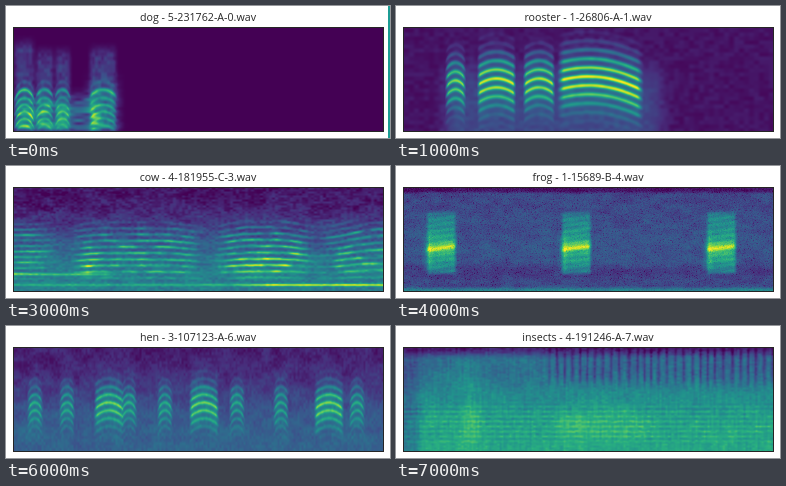
An HTML page with a canvas that plays this animation: 384 px wide and 132 px high, repeating every 8000 ms.

```html
<!DOCTYPE html>
<html lang="en">
<head>
<meta charset="utf-8">
<title>Animal sound spectrograms</title>
<style>
html, body { margin: 0; width: 100%; height: 100%; overflow: hidden; background: #fff; }
canvas { display: block; width: 384px; height: 132px; }
</style>
</head>
<body>
<canvas id="stage" width="384" height="132"></canvas>
<script>
const ctx = document.getElementById('stage').getContext('2d');
const LEFT = 8, TOP = 22, WIDTH = 369, HEIGHT = 103, HOLD = 1000;

const viridis = ['440154', '472d7b', '3b528b', '2c728e', '21918c', '28ae80', '5ec962', 'addc30', 'fde725']
  .map(hex => [0, 2, 4].map(i => parseInt(hex.slice(i, i + 2), 16)));

const clamp = (v, lo = 0, hi = 1) => Math.min(hi, Math.max(lo, v));
const mix = (a, b, t) => a + (b - a) * t;
const smooth = (a, b, v) => { const t = clamp((v - a) / (b - a)); return t * t * (3 - 2 * t); };
const bump = (v, center, width) => Math.exp(-(((v - center) / width) ** 2));
const gate = (v, a, b, soft = 2) => smooth(a - soft, a + soft, v) * (1 - smooth(b - soft, b + soft, v));
const blob = (x, y, cx, cy, rx, ry) => bump(x, cx, rx) * bump(y, cy, ry);

function grain(x, y) {
  const s = Math.sin(x * 12.9898 + y * 78.233) * 43758.5453;
  return s - Math.floor(s);
}

// Smooth value noise with cells of sx by sy pixels, centred on zero.
function cloud(x, y, sx, sy) {
  const u = x / sx, v = y / sy, i = Math.floor(u), j = Math.floor(v);
  const row = k => mix(grain(i, k), grain(i + 1, k), smooth(0, 1, u - i));
  return mix(row(j), row(j + 1), smooth(0, 1, v - j)) - 0.5;
}

// Stacked harmonics between a and b, arched by `bend` pixels and tilted by `tilt`.
function call(x, y, { a, b, cy, h, gap = 7, bend = 6, tilt = 0, peak = 0.5, level = 0.7, body = 0.4, soft = 2 }) {
  if (x < a - soft || x > b + soft) return 0;
  const u = (x - a) / (b - a);
  const line = y - cy - bend * ((u - peak) / Math.max(peak, 1 - peak)) ** 2 - tilt * (u - 0.5);
  const ridge = (0.5 + 0.5 * Math.cos(2 * Math.PI * line / gap)) ** 1.5;
  return level * gate(x, a, b, soft) * bump(line, 0, h) * (body + (1 - body) * ridge);
}

const sum = (x, y, calls) => calls.reduce((total, c) => total + call(x, y, c), 0);

const barks = [[9, 27, 0.4, 33], [30, 46, 0.3, 42], [49, 63, 0.25, 42], [84, 109, 0.3, 40]];

function dog(x, y) {
  let v = 0.3 * gate(x, 9, 92, 8) * smooth(78, 104, y) + 0.17 * gate(x, 80, 113, 7) * smooth(58, 100, y);
  v *= 0.85 + cloud(x, y, 9, 3);
  for (const [a, b, level, top] of barks) {
    const mid = (a + b) / 2, bend = a < 20 ? 8 : 6;
    v += gate(x, a, b, 4) * smooth(top - 6, top + 14, y) * (0.16 + 0.12 * cloud(x, y, 3, 4));
    v += call(x, y, { a, b, cy: 83, h: 7, gap: 9, bend, level: level * 1.1, body: 0.1 });
    v += call(x, y, { a, b, cy: 105, h: 15, gap: 7, bend, level, body: 0.25 });
    v += 0.35 * level * blob(x, y, mid, 119, (b - a) / 2, 3);
  }
  return v * (1 - 0.5 * smooth(121, 125, y));
}

const crows = [
  { a: 50, b: 68, cy: 74, h: 24, level: 0.65 },
  { a: 82, b: 118, cy: 72, h: 26, level: 0.75 },
  { a: 128, b: 157, cy: 72, h: 25, level: 0.7 },
  { a: 164, b: 244, cy: 70, h: 27, bend: 13, peak: 0.35, level: 0.8, soft: 4 }
].map(c => ({ gap: 9, body: 0.25, ...c }));

function rooster(x, y) {
  const tail = 0.16 * gate(x, 50, 264, 16) * smooth(38, 90, y);
  return 0.05 + tail + 0.06 * cloud(x, y, 5, 4) + sum(x, y, crows);
}

const grunts = [
  { a: 19, b: 30, cy: 80, h: 7, level: 0.26 },
  { a: 32, b: 46, cy: 82, h: 13, level: 0.34 },
  { a: 48, b: 60, cy: 80, h: 13, level: 0.36 },
  { a: 62, b: 74, cy: 77, h: 9, level: 0.28 },
  { a: 94, b: 104, cy: 81, h: 9, level: 0.34 },
  { a: 103, b: 117, cy: 64, h: 20, tilt: -10, level: 0.45 },
  { a: 130, b: 139, cy: 72, h: 16, tilt: -12, level: 0.45 },
  { a: 136, b: 163, cy: 62, h: 23, peak: 0.5, bend: 5, level: 0.6 },
  { a: 192, b: 210, cy: 80, h: 11, level: 0.38 },
  { a: 230, b: 247, cy: 68, h: 19, tilt: -12, level: 0.5 },
  { a: 247, b: 285, cy: 64, h: 23, peak: 0.5, bend: 5, level: 0.6 },
  { a: 312, b: 335, cy: 76, h: 17, level: 0.36 },
  { a: 352, b: 377, cy: 81, h: 14, level: 0.34 }
].map(c => ({ gap: 6.5, body: 0.4, ...c }));

function pig(x, y) {
  let v = 0.06 + 0.15 * smooth(25, 50, y) + 0.12 * smooth(50, 118, y);
  v += 0.08 * cloud(x, y, 12, 14) + 0.1 * cloud(x, y, 2, 3);
  for (const { a, b, level } of grunts) {
    v += 0.1 * gate(x, a, b, 3) * smooth(85, 105, y);
    if (level > 0.55) v += 0.3 * gate(x, a, b, 2) * gate(y, 28, 62, 6);
  }
  for (const gap of [82, 119, 222, 341]) v -= 0.08 * bump(x, gap, 3) * gate(y, 30, 110, 8);
  return v + sum(x, y, grunts) + 0.1 * bump(y, 122, 2);
}

function cow(x, y) {
  let v = 0.06 + 0.13 * smooth(30, 68, y) + 0.22 * smooth(55, 108, y);
  v += 0.09 * cloud(x, y, 14, 7) + 0.11 * cloud(x, y, 3, 2);
  const lift = 7 * gate(x, 65, 188, 35) + 8 * gate(x, 215, 299, 30) + 12 * smooth(295, 377, x);
  const height = clamp((120 - y) / 60, 0, 1.3);
  const ridge = (0.5 + 0.5 * Math.cos(2 * Math.PI * (y + lift * height - 118) / 5.5)) ** 1.5;
  const voiced = 0.22 * (1 - smooth(20, 60, x)) + 0.25 * gate(x, 70, 188, 14)
    + 0.3 * gate(x, 216, 300, 12) + 0.28 * smooth(300, 345, x);
  v += voiced * ridge * gate(y, 60, 110, 11) * (1 + 1.4 * cloud(x, y, 9, 5));
  v += 0.22 * blob(x, y, 85, 97, 12, 10) * ridge + 0.16 * blob(x, y, 260, 95, 28, 9) * ridge;
  v += 0.25 * bump(y, 108, 1.5) * (1 - smooth(90, 125, x));
  v += bump(y, 118.5, 1.4) * mix(0.17, 0.48, smooth(215, 265, x));
  return v + 0.09 * blob(x, y, 45, 45, 16, 12) * cloud(x, y, 2, 3);
}

function frog(x, y) {
  let v = 0.21 + 0.05 * bump(y, 78, 30) + 0.08 * cloud(x, y, 10, 5);
  v += 0.09 * (grain(x, y) - 0.5) - 0.1 * (grain(x + 91, y) > 0.94);
  v -= 0.17 * (1 - smooth(24, 28 + 2 * cloud(x, 0, 18, 1), y));
  v -= 0.06 * bump(y, 105, 6);
  v += 0.23 * smooth(119, 124, y);
  for (const start of [28, 163, 308]) {
    const u = (x - start) / 32;
    const shape = gate(x, start + 3, start + 31, 2.5) * gate(y, 46, 107, 3);
    const stripe = Math.cos(2 * Math.PI * (y + 4 * u) / 6);
    v += shape * (0.18 + 0.17 * bump(y, 83, 23) + 0.04 * stripe);
    v += 0.3 * gate(x, start + 2, start + 31, 3) * bump(y, 83 - 4 * u, 3.5);
    v += 0.1 * gate(x, start - 1, start + 7, 3) * gate(y, 67, 105, 7);
  }
  return v;
}

// A loud middle band, softer harmonics below it and faint ones above.
const meow = (a, b, cy, shape) => [
  { a, b, cy, h: 8, level: 0.5 },
  { a, b, cy: cy + 24, h: 19, level: 0.38 },
  { a, b, cy: cy - 16, h: 10, level: 0.2 }
].map(c => ({ gap: 6, body: 0.35, soft: 3, ...shape, ...c }));
const meows = [
  ...meow(49, 135, 66, { bend: 5, peak: 0.6, tilt: 0 }),
  ...meow(202, 324, 66, { bend: 6, peak: 0.6, tilt: -3 })
];

function cat(x, y) {
  let v = 0;
  for (const [a, b] of [[48, 137], [201, 328]]) {
    const inside = gate(x, a, b, 1.5);
    v += inside * smooth(24, 50, y) * (0.19 + 0.12 * cloud(x, y, 2, 14) + 0.08 * cloud(x, y, 3, 3));
    v += 0.25 * inside * bump(y, 114, 1.3);
  }
  return v + sum(x, y, meows);
}

const clucks = [22, 54, 89, 116, 152, 184, 224, 268, 309, 344].map((a, i) => (
  { a, b: a + (i % 3 === 2 ? 27 : 13), cy: 76, h: 21, gap: 8, bend: 6, level: i % 3 === 2 ? 0.54 : 0.36, body: 0.35 }
));

function hen(x, y) {
  return 0.09 + 0.22 * smooth(28, 112, y) + 0.08 * cloud(x, y, 10, 8)
    + 0.07 * cloud(x, y, 2, 3) + sum(x, y, clucks);
}

function insects(x, y) {
  const onset = mix(0.72, 1, smooth(16, 30, x));
  let v = 0.06 + 0.3 * smooth(21, 34, y) + 0.12 * smooth(40, 75, y) + 0.1 * smooth(70, 100, y);
  v *= onset;
  v += 0.07 * cloud(x, y, 2, 12) + 0.08 * cloud(x, y, 3, 2) + 0.05 * cloud(x, y, 25, 12);
  // Pulses leave dark stripes in the upper band and dashed rows in the lower one.
  const pulse = 0.5 + 0.5 * Math.cos(2 * Math.PI * x / 8 + 3 * cloud(x, 0, 20, 1));
  v -= 0.16 * pulse ** 2 * gate(y, 24, 58, 8) * smooth(135, 165, x);
  const dash = Math.cos(2 * Math.PI * y / 5) * (0.6 + cloud(x, y, 4, 5));
  v += 0.07 * dash * gate(y, 78, 116, 6);
  v += 0.13 * blob(x, y, 74, 92, 10, 24) + 0.08 * blob(x, y, 70, 48, 18, 14);
  v += 0.07 * gate(x, 158, 248, 10) * bump(y, 98, 20);
  return v;
}

const slides = [
  ['dog - 5-231762-A-0.wav', dog],
  ['rooster - 1-26806-A-1.wav', rooster],
  ['pig - 3-253084-A-2.wav', pig],
  ['cow - 4-181955-C-3.wav', cow],
  ['frog - 1-15689-B-4.wav', frog],
  ['cat - 1-56380-A-5.wav', cat],
  ['hen - 3-107123-A-6.wav', hen],
  ['insects - 4-191246-A-7.wav', insects]
].map(([title, field]) => ({ title, image: plot(field) }));

function plot(field) {
  const image = ctx.createImageData(WIDTH, HEIGHT);
  for (let y = 0, p = 0; y < HEIGHT; y++) {
    for (let x = 0; x < WIDTH; x++, p += 4) {
      const s = clamp(field(x + LEFT, y + TOP)) * (viridis.length - 1);
      const i = Math.min(Math.floor(s), viridis.length - 2);
      for (let c = 0; c < 3; c++) image.data[p + c] = mix(viridis[i][c], viridis[i + 1][c], s - i);
      image.data[p + 3] = 255;
    }
  }
  return image;
}

function draw(now) {
  const index = Math.floor(now / HOLD) % slides.length;
  const { title, image } = slides[index];
  ctx.fillStyle = '#fff';
  ctx.fillRect(0, 0, 384, 132);
  ctx.putImageData(image, LEFT, TOP);
  ctx.strokeStyle = '#262626';
  ctx.lineWidth = 1;
  ctx.strokeRect(LEFT - 0.5, TOP - 0.5, WIDTH + 1, HEIGHT + 1);
  ctx.fillStyle = '#262626';
  ctx.font = '10.67px "Open Sans", "Noto Sans", sans-serif';
  ctx.textAlign = 'center';
  ctx.fillText(title, 192, 15);
  if (index === 0) {
    ctx.fillStyle = '#1c9c94';
    ctx.fillRect(382, 0, 2, 132);
  }
}

const start = performance.now();
function tick() {
  draw(performance.now() - start);
  requestAnimationFrame(tick);
}
tick();
</script>
</body>
</html>
```
